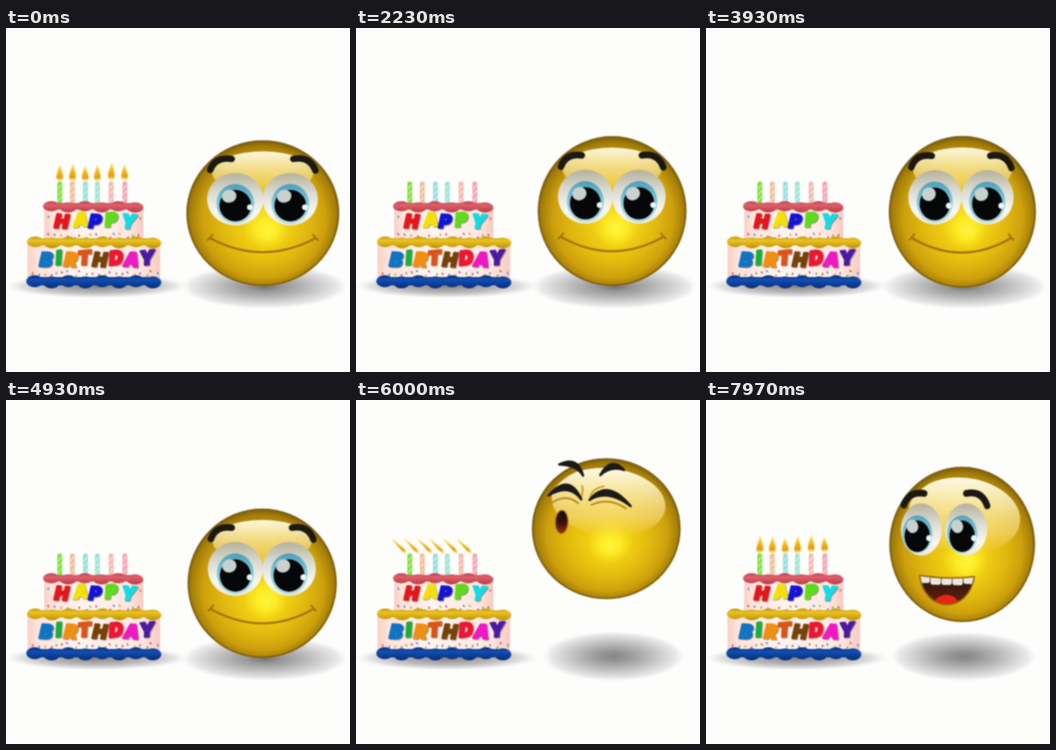
Animation of 576 by 576 pixels, one loop 8000 ms. Source, as an HTML page with a canvas:

```html
<!DOCTYPE html>
<html lang="en">
<head>
<meta charset="utf-8">
<title>Birthday smiley</title>
<style>
html, body { margin: 0; width: 100%; height: 100%; overflow: hidden; background: #fdfdfc; }
canvas { display: block; width: 576px; height: 576px; filter: blur(1px); }
</style>
</head>
<body>
<canvas id="stage" width="576" height="576"></canvas>
<script>
const ctx = document.getElementById('stage').getContext('2d');
const LOOP = 8000, CYCLE = 2515, STEP = 100 / 3;

// time, centre x, centre y, radius x, radius y, head turn
const POSES = [
  [0, 430, 310, 128, 122, 0],
  [130, 430, 325, 136, 108, .15],
  [230, 430, 293, 120, 134, .6],
  [330, 429, 253, 119, 135, 1],
  [425, 429, 241.5, 122, 130, 1],
  [600, 437, 234, 122, 131, 1],
  [755, 441, 233, 123, 133.5, 1],
  [870, 440, 224, 122, 132, 1],
  [970, 419, 215.5, 124.5, 118, 1],
  [1150, 417, 215, 124, 119, 1],
  [1260, 424, 250, 121, 128, .6],
  [1370, 429, 302, 121, 130, .1],
  [1450, 429, 324, 136, 109, 0],
  [1560, 429, 304, 121, 128, 0],
  [1680, 429, 308, 126, 124, 0],
  [1780, 429, 307, 125, 125, 0],
  [2415, 429, 307, 125, 125, 0],
  [2515, 430, 310, 128, 122, 0]
];

const lerp = (a, b, k) => a + (b - a) * k;
const ramp = (t, a, b) => {
  const k = Math.min(1, Math.max(0, (t - a) / (b - a)));
  return k * k * (3 - 2 * k);
};

function poseAt(t) {
  let i = 0;
  while (i < POSES.length - 2 && POSES[i + 1][0] <= t) i++;
  const row = n => POSES[Math.min(POSES.length - 1, Math.max(0, n))];
  const a = row(i), b = row(i + 1), before = row(i - 1), after = row(i + 2);
  const span = b[0] - a[0], u = (t - a[0]) / span, u2 = u * u, u3 = u2 * u;
  return a.slice(1).map((v, n) => {
    const c = n + 1;
    const m0 = (b[c] - before[c]) / (b[0] - before[0]) * span;
    const m1 = (after[c] - v) / (after[0] - a[0]) * span;
    return (2 * u3 - 3 * u2 + 1) * v + (u3 - 2 * u2 + u) * m0 +
      (3 * u2 - 2 * u3) * b[c] + (u3 - u2) * m1;
  });
}

function shade(gradient, stops) {
  stops.forEach(([at, color]) => gradient.addColorStop(at, color));
  return gradient;
}
const down = (y0, y1, ...stops) => shade(ctx.createLinearGradient(0, y0, 0, y1), stops);

function oval(x, y, rx, ry, fill, angle = 0) {
  ctx.beginPath();
  ctx.ellipse(x, y, rx, ry, angle, 0, 7);
  ctx.fillStyle = fill;
  ctx.fill();
}

function curve(points, color, width) {
  const [x0, y0, cx, cy, x1, y1] = points;
  ctx.beginPath();
  ctx.moveTo(x0, y0);
  ctx.quadraticCurveTo(cx, cy, x1, y1);
  ctx.strokeStyle = color;
  ctx.lineWidth = width;
  ctx.lineCap = 'round';
  ctx.stroke();
}

function crescent(points, thick) {
  const [x0, y0, cx, cy, x1, y1] = points;
  ctx.beginPath();
  ctx.moveTo(x0, y0);
  ctx.quadraticCurveTo(cx, cy - thick / 2, x1, y1);
  ctx.quadraticCurveTo(cx, cy + thick, x0, y0);
  ctx.fillStyle = ctx.strokeStyle = '#1c1a17';
  ctx.lineWidth = 4;
  ctx.lineJoin = 'round';
  ctx.fill();
  ctx.stroke();
}

function shadow(x, y, rx, ry, stops) {
  ctx.save();
  ctx.translate(x, y);
  ctx.scale(rx, ry);
  oval(0, 0, 1, 1, shade(ctx.createRadialGradient(0, 0, 0, 0, 0, 1), stops));
  ctx.restore();
}

// ---- cake ----
function icing(x0, x1, y, height, light, dark) {
  const bumps = Math.round((x1 - x0) / 27), w = (x1 - x0) / bumps;
  ctx.beginPath();
  ctx.roundRect(x0 + 4, y + 3, x1 - x0 - 8, height - 7, 5);
  for (let i = 0; i < bumps; i++) {
    const cx = x0 + w * (i + .5), drop = i % 2 ? 1.5 : -.5;
    ctx.moveTo(cx + w * .5, y + height / 2 + drop);
    ctx.ellipse(cx, y + height / 2 + drop, w * .5, height / 2 - .5, 0, 0, 7);
  }
  ctx.fillStyle = down(y, y + height, [0, dark], [.35, light], [1, dark]);
  ctx.fill();
}

function tier(x0, x1, y0, y1) {
  ctx.fillStyle = shade(ctx.createLinearGradient(x0, 0, x1, 0), [
    [0, '#f8cfc4'], [.08, '#ffe4db'], [.4, '#fff4ef'], [.85, '#ffe8e1'], [1, '#f6cbc2']]);
  ctx.fillRect(x0, y0, x1 - x0, y1 - y0);
}

function sprinkles(x0, x1, y, seed) {
  const colors = ['#d65a5a', '#5e93c8', '#dca045', '#b068a8', '#70ad66'];
  for (let x = x0, i = 0; x < x1; x += 10, i++) {
    const r = Math.abs(Math.sin(i * 12.9 + seed) * 437.5) % 1;
    oval(x + r * 5, y + r * 8 - 4, 1.4, 2.4, colors[i % 5], r * 2 - 1);
  }
}

function letters(word, xs, y, colors, size) {
  ctx.font = `italic 900 ${size}px Inter, "DejaVu Sans", sans-serif`;
  ctx.textAlign = 'center';
  ctx.textBaseline = 'middle';
  ctx.lineJoin = 'round';
  ctx.lineWidth = 3.5;
  const ink = (letter, color, dx, dy) => {
    ctx.fillStyle = ctx.strokeStyle = color;
    ctx.strokeText(letter, dx, dy);
    ctx.fillText(letter, dx, dy);
  };
  [...word].forEach((letter, i) => {
    ctx.save();
    ctx.translate(xs[i], y + (i % 2 ? -1.5 : 1.5));
    ctx.rotate(i % 2 ? -.1 : .06);
    ink(letter, '#5b4a4a80', 1.5, 1.5);
    ink(letter, colors[i], 0, 0);
    ctx.restore();
  });
}

const CANDLES = [[90, '#7fe03a'], [111, '#f3bd96'], [133, '#94dfdc'],
  [153, '#9fe3d2'], [176, '#f5b9ae'], [199, '#f5a4b0']];

function candle(x, color) {
  ctx.fillStyle = color;
  ctx.beginPath();
  ctx.roundRect(x - 4, 257, 8, 37, 4);
  ctx.fill();
  for (let y = 266; y < 292; y += 10) curve([x - 2, y + 3, x, y, x + 2, y - 3], '#ffffff90', 2);
}

function flame(x, i, time, bend, size) {
  if (size < .03) return;
  const flicker = Math.sin(time / 70 + i * 2.1);
  const length = lerp(26 + 2 * flicker, 33, bend) * size;
  const width = lerp(6, 2.5, bend) * Math.min(1, size * 1.3);
  ctx.save();
  ctx.translate(x - 6 * bend, 256 - (i > 3 ? 2 : 0) * (1 - bend));
  ctx.rotate(lerp(flicker * .05, -.8, bend));
  ctx.beginPath();
  ctx.moveTo(0, -length);
  ctx.bezierCurveTo(width * .5, -length * .65, width * 1.7, 0, 0, 0);
  ctx.bezierCurveTo(-width * 1.7, 0, -width * .5, -length * .65, 0, -length);
  ctx.strokeStyle = '#ffeb8a90';
  ctx.lineWidth = 3;
  ctx.stroke();
  ctx.fillStyle = down(-length, 0, [0, '#fbe070'], [.45, '#f0b71c'], [.78, '#e39a14'], [1, '#fff0a0']);
  ctx.fill();
  ctx.restore();
}

function cake(phase, time) {
  shadow(152, 432, 160, 21, [[0, '#858585'], [.55, '#bcbcbc'], [.8, '#e2e2e2'], [1, '#fdfdfc00']]);
  CANDLES.forEach(([x, color]) => candle(x, color));
  tier(64, 230, 300, 356);
  sprinkles(70, 228, 348, 1);
  oval(71, 316, 1.5, 2.5, '#6d9dba');
  oval(225, 319, 1.5, 2.5, '#c97c76');
  icing(62, 230, 290, 18, '#e0606a', '#b9404a');
  tier(36, 258, 362, 422);
  sprinkles(42, 256, 411, 5);
  icing(35, 260, 349, 19, '#ebc520', '#c0930c');
  icing(34, 260, 414, 21, '#124fb4', '#082f7c');
  letters('HAPPY', [93, 125, 149, 176, 205], 324,
    ['#e6151d', '#f2e00a', '#1414d6', '#5edc1c', '#14dbe2'], 31);
  letters('BIRTHDAY', [67, 88, 108, 131, 157, 184, 210, 236], 388,
    ['#0f74c4', '#18b038', '#f08f10', '#dc5418', '#754208', '#ee1632', '#ee18c4', '#4a1aa2'], 32);
  const bend = phase < 2000 ? ramp(phase, 870, 950) : 0;
  const size = phase < 2000 ? 1 - ramp(phase, 1020, 1150) : ramp(phase, 2425, 2505);
  CANDLES.forEach(([x], i) => flame(x, i, time, bend, size));
}

// ---- smiley ----
function ball(turn) {
  oval(0, 0, 125, 125, shade(ctx.createRadialGradient(8, 31, 2, 0, 4, 129), [
    [0, '#fff43c'], [.12, '#fcea24'], [.28, '#efcd12'], [.55, '#e0b70f'], [.78, '#cda00c'], [.93, '#a47d09'], [1, '#7a5c0a']]));
  ctx.beginPath();
  ctx.arc(0, 0, 123.5, 0, 7);
  ctx.strokeStyle = '#7d5f10';
  ctx.lineWidth = 2.5;
  ctx.stroke();
  ctx.save();
  ctx.beginPath();
  ctx.arc(0, 0, 113, 0, 7);
  ctx.clip();
  oval(4 * turn, lerp(-70, -47, turn), lerp(83, 96, turn), lerp(36, 60, turn),
    down(-112, lerp(-32, 14, turn), [0, '#fffdee'], [.3, '#fff6c6d8'], [.75, '#fbe08a90'], [1, '#f5d45820']), .12 * turn);
  ctx.restore();
}

function eye(x, y, rx, ry, turn) {
  oval(x, y, rx, ry, down(y - ry, y + ry, [0, '#b5b29c'], [.35, '#d9d8ce'], [.75, '#f8f8f3'], [1, '#ebe8d2']));
  const ix = x - 7 * turn, iy = y + 8, k = lerp(1, .84, turn);
  oval(ix, iy, 31 * k, 34 * lerp(1, .9, turn), down(iy - 34, iy + 34, [0, '#4b9fb9'], [.5, '#83cbd9'], [1, '#b5dce2']));
  oval(ix, iy + 3, 26 * k, 27 * lerp(1, .94, turn), '#050708');
  oval(ix - 10 * k, iy - 13, 12 * k, 11, '#c8d1cd', -.4);
  oval(ix + 24 * k, iy + 6, 5, 5, '#e9f5f3');
}

function openEyes(turn) {
  eye(lerp(-45, -70, turn), -24, lerp(46, 35, turn), lerp(45, 42, turn), turn);
  eye(lerp(45, 7, turn), -24, lerp(45, 36, turn), lerp(45, 42, turn), turn);
  const lx = -14 * turn, rx = -43 * turn, y = 11 * turn;
  curve([-86 + lx, -74 + y, -78 + lx, -97 + y, -51 + lx, -93 + y], '#1d1812', 11);
  curve([50 + rx, -93 + y, 77 + rx, -98 + y, 86 + rx, -73 + y], '#1d1812', 11);
}

function shutEyes() {
  curve([-91, -46, -68, -63, -47, -45], '#b98818', 3);
  curve([-25, -42, 4, -57, 33, -36], '#b98818', 3);
  curve([-42, -55, -38, -68, -41, -76], '#c99d24', 3);
  curve([-27, -57, -22, -72, -4, -75], '#c99d24', 3);
  crescent([-97, -59, -62, -94, -42, -52], 13);
  crescent([-28, -51, 2, -84, 41, -40], 13);
  crescent([-79, -114, -48, -124, -39, -94], 12);
  crescent([-10, -95, 8, -124, 30, -104], 12);
}

function grin(x, y, w, h, angle) {
  const mouth = new Path2D();
  mouth.moveTo(-w, 0);
  mouth.quadraticCurveTo(0, 6, w, 0);
  mouth.bezierCurveTo(w * .8, h * 1.33, -w * .8, h * 1.33, -w, 0);
  mouth.closePath();
  ctx.save();
  ctx.translate(x, y);
  ctx.rotate(angle);
  ctx.fillStyle = down(0, h, [0, '#24100a'], [1, '#6b2311']);
  ctx.fill(mouth);
  ctx.save();
  ctx.clip(mouth);
  oval(0, h * 1.02, w * .46, h * .36, '#e92513');
  ctx.fillStyle = '#e9e8e2';
  const tooth = w * 2 / 5;
  for (let i = 0; i < 5; i++) {
    ctx.beginPath();
    ctx.roundRect(i * tooth - w, -4, tooth - 1, Math.min(h * .4, i % 4 ? 20 : 16), 4);
    ctx.fill();
  }
  ctx.restore();
  ctx.strokeStyle = '#94660f';
  ctx.lineWidth = 2.5;
  ctx.stroke(mouth);
  ctx.restore();
}

function smile(turn) {
  const dx = -24 * turn, w = lerp(86, 58, turn);
  curve([dx - w, 43, dx, 91, dx + w, 43], '#a0720b', 3.5);
  curve([dx - w - 4, 46, dx - w, 42, dx - w + 4, 37], '#a0720b', 3);
  curve([dx + w + 4, 46, dx + w, 42, dx + w - 4, 37], '#a0720b', 3);
}

function smiley(phase) {
  const [x, y, rx, ry, turn] = poseAt(phase);
  const lift = Math.min(1, Math.max(0, (432 - y - ry) / 70));
  shadow(lerp(433, 431, lift), lerp(433, 429, lift), lerp(143, 122, lift), lerp(38, 43, lift), [
    [0, lift > .3 ? '#858585' : '#707070'], [.2, '#979797'], [.43, '#b2b2b2'],
    [.68, '#d2d2d2'], [.88, '#ececec'], [1, '#fdfdfc00']]);
  ctx.save();
  ctx.translate(x, y);
  ctx.scale(rx / 125, ry / 125);
  ball(turn);
  const shut = phase > 570 && phase < 1240;
  if (shut) {
    const back = 1 - ramp(phase, 870, 960);
    ctx.save();
    ctx.translate(8 * back, -6 * back);
    shutEyes();
    ctx.restore();
  } else openEyes(turn);

  if (phase > 890 && phase < 1180) {
    oval(-75, -12, 11.5, 21.5, '#aa710d', .04);
    oval(-75, -12, 9.5, 19.5, down(-32, 8, [0, '#130b08'], [.55, '#3a140b'], [1, '#a32b16']), .04);
  } else if (phase > 170 && phase < 900) {
    const open = ramp(phase, 150, 330), laugh = ramp(phase, 520, 630);
    grin(lerp(-26 * turn, -34, laugh), lerp(51, -41, laugh), lerp(47, 59, laugh),
      lerp(46 * open, 58, laugh), lerp(.02, .13, laugh));
  } else smile(turn);
  ctx.restore();
}

function draw(now) {
  const time = Math.floor((now % LOOP) / STEP + .01) * STEP;
  const phase = time % CYCLE;
  ctx.fillStyle = '#fdfdfc';
  ctx.fillRect(0, 0, 576, 576);
  cake(phase, time);
  smiley(phase);
}

const start = performance.now();
function tick() {
  draw(performance.now() - start);
  requestAnimationFrame(tick);
}
tick();
</script>
</body>
</html>
```
